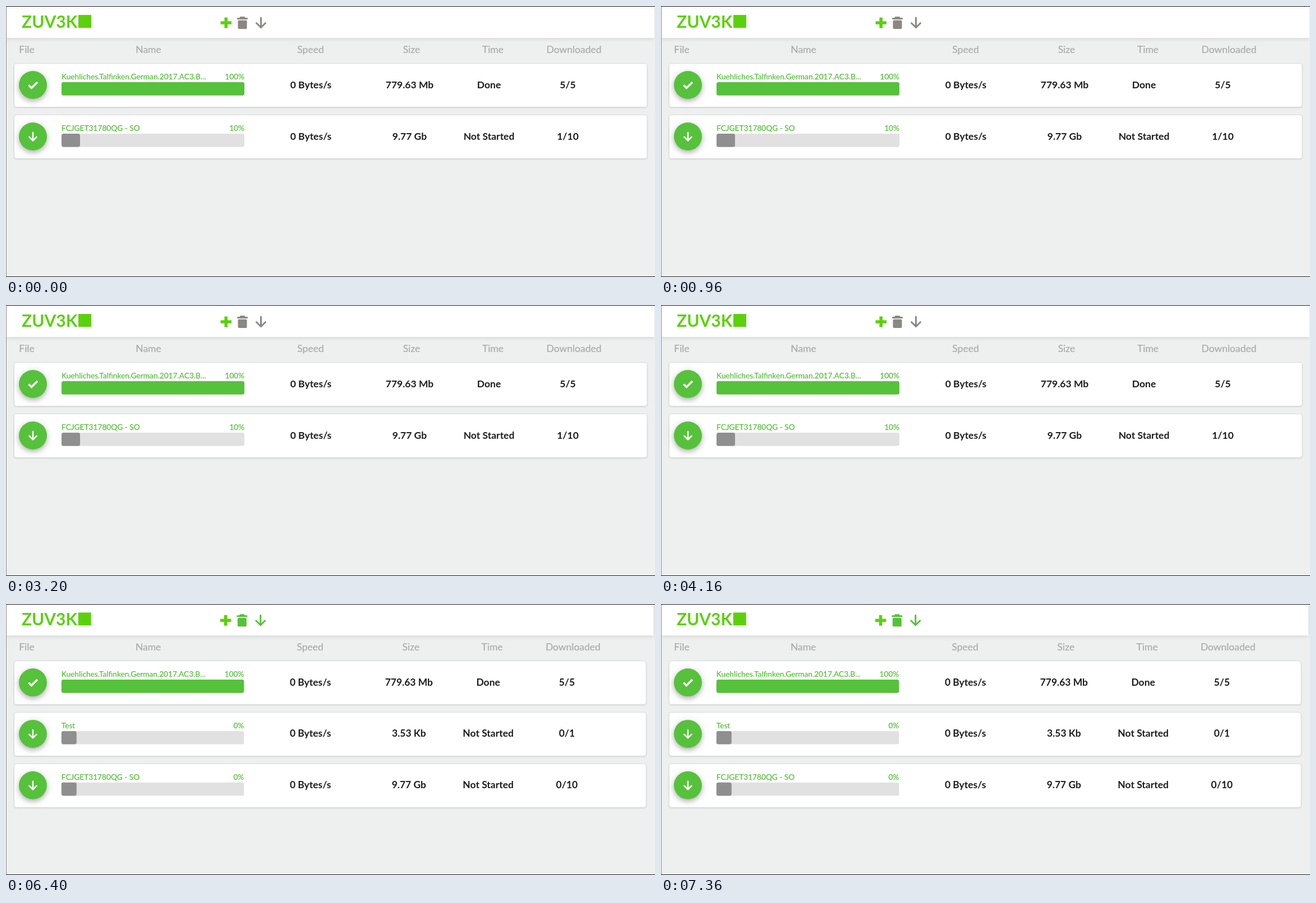
Recreate the animation shown at these times as an HTML page. Size 1157 by 484 pixels, loop 8 s.

```html
<!DOCTYPE html>
<html lang="en">
<head>
<meta charset="utf-8">
<title>Download manager</title>
<style>
  html, body { margin: 0; width: 100%; height: 100%; overflow: hidden; background: #eef0f0; }
  svg { display: block; width: 1157px; height: 484px; font-family: Lato, sans-serif; }
  text { white-space: pre; fill: currentColor; }
  .head { font-size: 17.5px; color: #a9a9a9; text-anchor: middle; stroke: currentColor; stroke-width: .2px; }
  .value { font-size: 17.5px; font-weight: 700; color: #1b1c1d; text-anchor: middle; }
  .small { font-size: 13.7px; color: #56c13b; stroke: currentColor; stroke-width: .25px; }
  .end { text-anchor: end; }
  .label { color: #666; stroke-width: .4px; }
  .hint { color: #dadada; }
  .button { font-weight: 700; color: #fff; text-anchor: middle; }
  .title { font-size: 23.3px; font-weight: 700; color: #1b1c1d; }
  .brand { font-size: 30px; font-weight: 700; color: #5bd10c; }
  .topbar { filter: drop-shadow(0 1px 4px rgba(0,0,0,.13)); }
  .card { filter: drop-shadow(0 1px 1px rgba(0,0,0,.12)); }
  .disc { filter: drop-shadow(0 4px 4px rgba(0,0,0,.24)) drop-shadow(0 1px 8px rgba(0,0,0,.1)); }
</style>
</head>
<body>
<svg id="stage" viewBox="0 0 1157 484"></svg>
<script>
const GREEN = '#56c13b', BRIGHT = '#5bd10c', GRAY = '#8b8783', EDGE = '#dadcdc';
const SCENE_MS = 1600;
const scheme = 'http://';
const movie = 'Kuehliches.Talfinken.German.2017.AC3.B...';
const archive = 'FCJGET31780QG - SO';

const text = (x, y, str, cls, extra = '') => `<text x="${x}" y="${y}" class="${cls}" ${extra}>${str}</text>`;
const box = (x, y, w, h, fill, r = 0, extra = '') =>
  `<rect x="${x}" y="${y}" width="${w}" height="${h}" rx="${r}" fill="${fill}" ${extra}/>`;
const line = (d, color, width, extra = '') =>
  `<path d="${d}" fill="none" stroke="${color}" stroke-width="${width}" ${extra}/>`;
const group = (x, y, body, scale = 1) => `<g transform="translate(${x} ${y}) scale(${scale})">${body}</g>`;
const ROUND = 'stroke-linecap="round" stroke-linejoin="round"';

function topBar(iconColor, dx = 0, dy = 0) {
  const icons =
    line('M382.5 30H402M392.2 20.5V39.5', BRIGHT, 5.6) +
    box(412, 21, 19, 3, iconColor, 1) + box(417, 19, 9, 3, iconColor, 1) +
    box(413.5, 25.5, 16, 15.5, iconColor, 2) +
    line('M454.5 21V38M446.5 30.5L454.5 38.5L462.5 30.5', iconColor, 3, ROUND);
  return box(0, 0, 1156, 57, '#fff', 0, 'class="topbar"') +
    group(dx, dy, text(28, 38.5, 'ZUV3K', 'brand') + box(129, 16, 23, 23, BRIGHT) + icons);
}

const columnHeads = () =>
  [['File', 37], ['Name', 254], ['Speed', 543], ['Size', 723], ['Time', 868], ['Downloaded', 1012.5]]
    .map(([name, x]) => text(x, 83.5, name, 'head')).join('');

const values = (size, state, count, y) =>
  [['0 Bytes/s', 543.5], [size, 719.5], [state, 861], [count, 1001.5]]
    .map(([str, x]) => text(x, y, str, 'value')).join('');

function disc(x, y, done) {
  const sign = done ? 'M-7.5 .5L-2.5 5.5L8 -5' : 'M0 -7V7M-6.5 1L0 7.5L6.5 1';
  return group(x, y, `<circle r="25" fill="${GREEN}" class="disc"/>` +
    line(sign, '#fff', done ? 3.6 : 2.6, done ? '' : ROUND));
}

function progress(x, y, name, percent, filled, color = GREEN) {
  const full = 425 - x;
  return text(x, y - 5, name, 'small', `style="color:${color}"`) +
    text(425, y - 5, percent + '%', 'small end', `style="color:${color}"`) +
    box(x, y, full, 23.7, '#e1e1e1', 3.5) +
    box(x, y, filled || full, 23.7, filled ? '#8f8f8f' : GREEN, 3.5);
}

// A card: [name, percent, filled bar width (0 = full), size, state, count]
function card([name, percent, filled, size, state, count], index) {
  return group(0, 92 * index,
    box(14.5, 102.5, 1128.5, 78, '#fff', 4, `stroke="${EDGE}" class="card"`) +
    disc(48, 141, !filled) + progress(99, 136, name, percent, filled) +
    values(size, state, count, 146.5));
}

const windowEdge = () =>
  line('M.5 0V484', '#8a8a8a', 1) + line('M0 .5H1157M0 483.5H1157', '#161616', 1);

const listScene = (cards, iconColor, dy = 0, scale = 1) =>
  group(0, dy, topBar(iconColor) + columnHeads() + cards.map(card).join(''), scale) + windowEdge();

function expandedScene() {
  let rows = '';
  for (let i = 0; i < 4; i++) {
    rows += group(0, 77.7 * i,
      line('M15 257.5H1143', EDGE, 1.2) +
      line('M37 209L44 216L37 223M47 209L54 216L47 223', '#1b1c1d', 3.4) +
      disc(118.5, 218, true) + progress(170, 213, 'TVG21A3BRx6F201801191106...', 100, 0) +
      values('190.74 Mb', 'Done', 'Downloaded', 223.7));
  }
  const selected = '<path d="M15 180V106Q15 103 18 103H1140Q1143 103 1143 106V180Z" fill="#b9d400"/>' +
    disc(48, 141, true) + progress(99, 136, movie, 100, 0, '#fff') +
    values('779.63 Mb', 'Done', '5/5', 146.5);
  return group(0, -2, topBar(GREEN) + columnHeads() +
    box(15, 110, 1128, 390, '#fff', 4, `stroke="${EDGE}"`) + selected + rows, 0.9993) +
    line('M.5 0V484', '#b5b5b5', 1) + box(0, 482, 1157, 2, '#24251d');
}

const field = (y, split, right, label, hint) =>
  box(13, y, right - 13, 36, '#fff', 4, `stroke="${EDGE}"`) +
  box(13, y, split - 13, 36, '#e4e5e5', 3) +
  text(24.5, y + 23, label, 'small label') + text(split + 14.5, y + 24, hint, 'small hint');

const button = (x, y, w, fill, label) =>
  box(x, y, w, 35, fill, 4) + text(x + w / 2, y + 23, label, 'small button');

function formScene() {
  const host = scheme + 'www.plonk-vatira.biz';
  return topBar(GREEN, -1.7, -0.5) + line('M0 .5H1157', '#d4d5d5', 1) +
    text(12.5, 88.5, 'Container', 'title') + field(109, 70.5, 264, 'Name', 'Container name') +
    text(12.5, 192.5, 'Links', 'title') + button(72, 169.5, 65, '#1b1c1d', 'Add') +
    field(218.5, 72.5, 267, scheme, host) +
    line('M275 229.5L290.5 245.5M290.5 229.5L275 245.5', BRIGHT, 6) +
    button(13, 274.5, 70, '#5a8bd8', 'Send') +
    text(13, 343.5, `Example link: ${host}/dl/4KR7SB1PXTH5`, 'small') +
    line('M577.5 68V347', EDGE, 1) +
    box(592.5, 69.5, 191.5, 192, '#ebeded', 4, 'stroke="#6cc663" stroke-width="2"') +
    text(593.5, 86, 'Try dropping some files here, or', 'small') +
    text(593.5, 105, 'click to select files to upload.', 'small') +
    '<circle cx="694" cy="194" r="30" fill="#34393c" class="disc"/>';
}

const finished = [movie, 100, 0, '779.63 Mb', 'Done', '5/5'];
const overview = listScene(
  [finished, [archive, 10, 33, '9.77 Gb', 'Not Started', '1/10']], GRAY);
const scenes = [
  overview,
  expandedScene(),
  overview,
  formScene(),
  listScene([
    finished,
    ['Test', 0, 27, '3.53 Kb', 'Not Started', '0/1'],
    [archive, 0, 27, '9.77 Gb', 'Not Started', '0/10'],
  ], GREEN, -0.7, 0.9984),
];

const stage = document.getElementById('stage');
const start = performance.now();
let shown = -1;
function draw(now) {
  const index = Math.floor(Math.max(0, now - start) / SCENE_MS) % scenes.length;
  if (index !== shown) stage.innerHTML = scenes[shown = index];
  requestAnimationFrame(draw);
}
draw(start);
</script>
</body>
</html>
```
